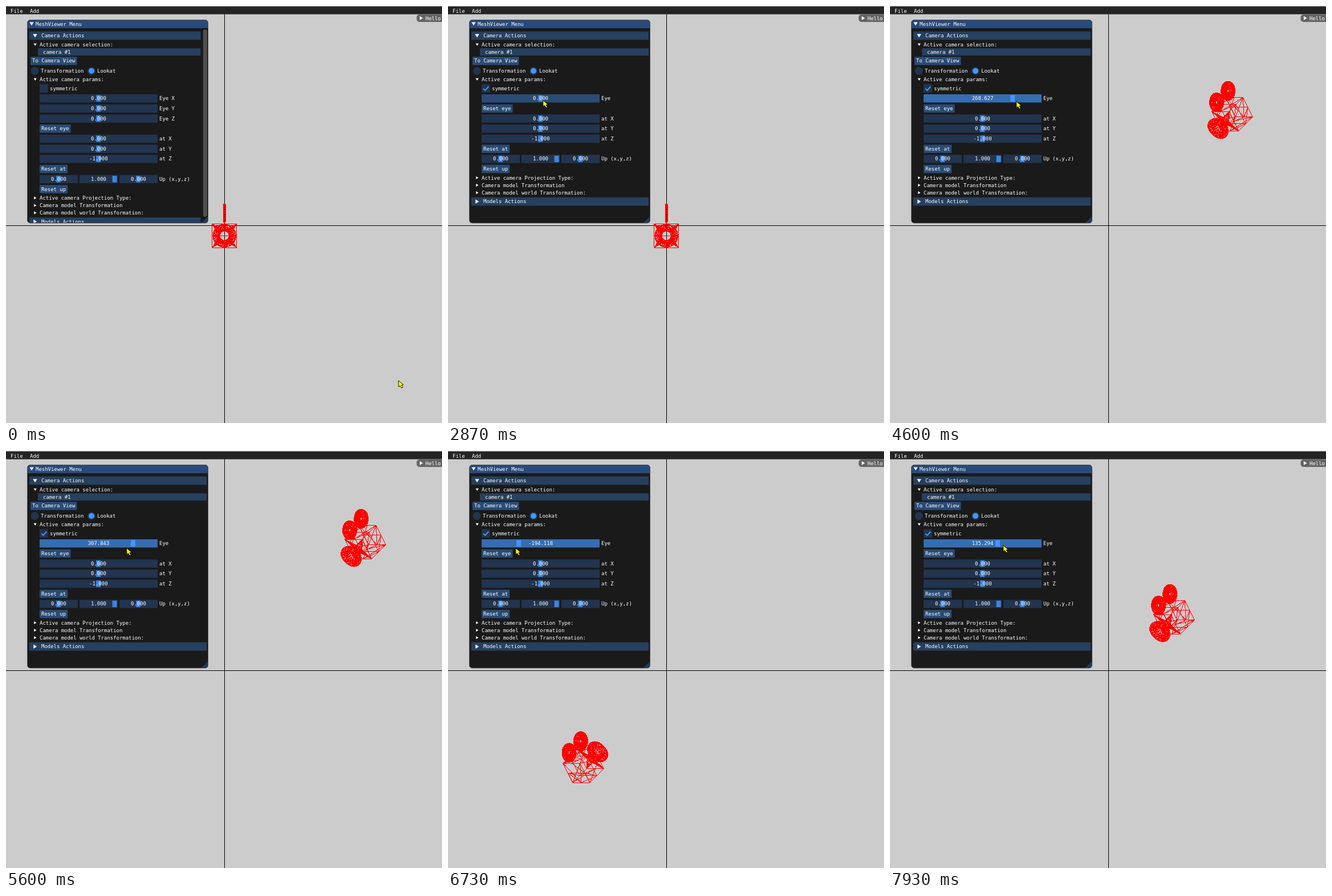
These frames come from a looping animation (765x732 px, 8 s). An HTML page:

```html
<!DOCTYPE html>
<html lang="en">
<head>
<meta charset="utf-8">
<title>Mesh viewer</title>
<style>
html, body { margin: 0; width: 100%; height: 100%; overflow: hidden; background: #ccc; }
svg { display: block; width: 765px; height: 732px; }
text { font: 8.95px "DejaVu Sans Mono", monospace; fill: #fff; white-space: pre; }
</style>
</head>
<body>
<svg id="stage" viewBox="0 0 765 732" xmlns="http://www.w3.org/2000/svg">
  <defs><clipPath id="inside"><rect x="38" y="39" width="316" height="341.5"/></clipPath></defs>
</svg>
<script>
const NS = 'http://www.w3.org/2000/svg';
const stage = document.getElementById('stage');
const C = {
  frame: '#22344e', hover: '#2a4c74', active: '#356db0', header: '#26405f',
  grab: '#3d85e0', bright: '#4296fa'
};
const ROW = 17.7, CHAR = 5.39;

// ---------- drawing helpers ----------
function el(parent, tag, attrs) {
  const node = document.createElementNS(NS, tag);
  for (const key in attrs) node.setAttribute(key, attrs[key]);
  parent.appendChild(node);
  return node;
}
const rect = (p, x, y, width, height, fill, rx = 0) => el(p, 'rect', { x, y, width, height, fill, rx });
function label(p, x, mid, str, anchor = 'start') {
  const node = el(p, 'text', { x, y: mid + 3, 'text-anchor': anchor });
  node.textContent = str;
  return node;
}
function arrow(p, x, y, r, down) {
  const d = down ? `M${x - r} ${y - r * .75}h${2 * r}l${-r} ${1.6 * r}z`
                 : `M${x - r * .75} ${y - r}v${2 * r}l${1.6 * r} ${-r}z`;
  el(p, 'path', { d, fill: '#fff' });
}
function header(p, mid, str, down) {
  const bar = rect(p, 41, mid - 7.3, 311, 14.6, C.header);
  arrow(p, 51, mid, 3.7, down);
  label(p, 62, mid, str);
  return bar;
}
function tree(p, mid, str, down) {
  arrow(p, 51.2, mid - .3, 2.6, down);
  label(p, 59, mid, str);
}
function button(p, x, mid, str) {
  rect(p, x, mid - 7.2, str.length * CHAR + 6, 14.4, C.hover);
  label(p, x + 3, mid, str);
}
function slider(p, x, width, mid, value, grabX, name) {
  const bg = rect(p, x, mid - 7.2, width, 14.4, C.frame);
  const grab = rect(p, grabX - 4, mid - 5.7, 8, 11.4, C.grab);
  const text = label(p, x + width / 2, mid, value, 'middle');
  const title = name && label(p, 269, mid, name);
  return { bg, grab, text, title };
}

// ---------- scene ----------
rect(stage, 383, 0, 1, 732, '#000');
rect(stage, 0, 385, 765, 1, '#000');
const model = el(stage, 'path', {
  fill: 'none', stroke: '#f00', 'stroke-width': 1, 'shape-rendering': 'crispEdges'
});

rect(stage, 0, 0, 765, 14.5, '#242424');
rect(stage, 0, 0, 765, 1, '#9a9a9a');
label(stage, 8, 8.5, 'File');
label(stage, 42, 8.5, 'Add');

rect(stage, 720.5, 15, 60, 13, '#646464', 5);
arrow(stage, 728.5, 21.3, 3.5, false);
label(stage, 736, 21.5, 'Hello, world!');

// ---------- menu window ----------
rect(stage, 37.5, 24.5, 317, 356.5, '#1a1a1a', 5);
el(stage, 'path', { d: 'M38 39V29.500q0-5 5-5H349q5 0 5 5V39z', fill: '#294a7a' });
arrow(stage, 45, 31.2, 3.6, true);
label(stage, 52, 31.5, 'MeshViewer Menu');

const body = el(stage, 'g', { 'clip-path': 'url(#inside)' });
const wideBars = [header(body, 52, 'Camera Actions', true)];
tree(body, 68, 'Active camera selection:', true);
wideBars.push(rect(body, 56, 74.3, 296, 12.8, C.header));
label(body, 65, 81, 'camera #1');
button(body, 43, 96.4, 'To Camera View');
const dot = (cx, r, fill) => el(body, 'circle', { cx, cy: 114, r, fill });
dot(50.5, 7, C.frame);
label(body, 61, 114, 'Transformation');
dot(150, 7, C.frame);
dot(150, 5, C.bright);
label(body, 160, 114, 'Lookat');
tree(body, 129, 'Active camera params:', true);
const check = rect(body, 59, 137.2, 14.8, 14.8, C.frame);
const tick = el(body, 'path', {
  d: 'M62 144.800l3.200 3.300 6-6.600', fill: 'none', stroke: C.bright, 'stroke-width': 1.9
});
label(body, 77, 145, 'symmetric');

const eye = slider(body, 59, 207, 162.2, '0.000', 162.3, 'Eye X');
const extra = el(body, 'g', {});
['Eye Y', 'Eye Z'].forEach((name, i) =>
  slider(extra, 59, 207, 162.2 + ROW * (i + 1), '0.000', 162.3, name));

const lower = el(body, 'g', {});
const rowY = n => 162.2 + ROW * n;
button(lower, 59, rowY(3), 'Reset eye');
['X', 'Y', 'Z'].forEach((axis, i) =>
  slider(lower, 59, 207, rowY(4 + i), i < 2 ? '0.000' : '-1.000', 162.2, 'at ' + axis));
button(lower, 59, rowY(7), 'Reset at');
slider(lower, 59, 67, rowY(8), '0.000', 92.2);
slider(lower, 129, 67, rowY(8), '1.000', 190.6);
slider(lower, 199, 67, rowY(8), '0.000', 232.2, 'Up (x,y,z)');
button(lower, 59, rowY(9), 'Reset up');
['Active camera Projection Type:', 'Camera model Transformation', 'Camera model world Transformation:']
  .forEach((str, i) => tree(lower, 337.2 + 13.1 * i, str, false));
wideBars.push(header(lower, 378.6, 'Models Actions', false));

const scroll = el(stage, 'g', {});
rect(scroll, 344.5, 39, 9.5, 332, '#121212');
rect(scroll, 345.7, 41, 7.3, 329, '#4f4f4f', 3.6);
el(stage, 'path', { d: 'M354 369.500V377q0 4-4 4H342.500z', fill: '#223a58' });
el(stage, 'rect', {
  x: 37.5, y: 24.5, width: 317, height: 356.5, rx: 5,
  fill: 'none', stroke: '#434350', 'stroke-width': .8
});

const cursor = el(stage, 'path', {
  d: 'M.500.500L1 11.800 3.500 9.500 6 13.500 8.300 12.500 6 8.500 9.300 7.800z',
  fill: '#ff0', stroke: '#000', 'stroke-width': .9, 'stroke-linejoin': 'round'
});

// ---------- movie camera mesh: X right, Y up, Z backwards ----------
const edges = [];
const line = (...pts) => { for (let i = 1; i < pts.length; i++) edges.push([pts[i - 1], pts[i]]); };
const mid = (a, b) => a.map((n, i) => (n + b[i]) / 2);

// A surface of triangles through successive rings given as point(angle).
function surface(rings, count) {
  const at = (r, i) => rings[r]((i + r % 2 / 2) * 2 * Math.PI / count);
  for (let r = 0; r < rings.length; r++)
    for (let i = 0; i < count; i++) {
      line(at(r, i), at(r, i + 1));
      if (r) {
        const shift = r % 2 ? 1 : -1;
        line(at(r - 1, i), at(r, i));
        line(at(r - 1, i), at(r, i - shift));
      }
    }
}

// reels
for (const z of [23, -12])
  surface([[2, 4], [2, 8], [2, 12], [2, 15], [1, 16.7], [-1, 16.7], [-2, 15], [-2, 12], [-2, 8], [-2, 4]]
    .map(([x, r]) => a => [x, 21.5 + r * Math.sin(a), z + r * Math.cos(a)]), 22);

// flared lens
surface([[8, -13.5], [8.5, -18], [11, -23], [15, -27], [19, -31], [20.3, -36], [19, -40], [15.5, -41], [12, -38], [9, -32]]
  .map(([r, z]) => a => [r * Math.cos(a), -18 + r * Math.sin(a), z]), 24);

// body
const corner = (x, y, z) => [x ? 21.3 : -21.3, y ? 3 : -38.7, z ? 29 : -13.5];
function face(a, b, c, d) {
  const ab = mid(a, b), bc = mid(b, c), cd = mid(c, d), da = mid(d, a);
  line(a, b, c, d, a);
  line(ab, c);
  line(ab, d);
  line(ab, bc);
  line(da, cd);
  line(da, bc);
}
const [p0, p1, p2, p3, p4, p5, p6, p7] =
  [0, 1, 2, 3, 4, 5, 6, 7].map(i => corner(i & 1, i & 2, i & 4));
face(p4, p5, p7, p6);
face(p0, p1, p5, p4);
face(p2, p3, p7, p6);
face(p0, p2, p6, p4);
face(p1, p3, p7, p5);
line(p0, p1, p3, p2, p0);
[[p3, 0], [p2, 1], [p0, 2], [p1, 3]].forEach(([p, quarter]) => {
  for (let i = 0; i <= 6; i++) {
    const a = (quarter + i / 6) * Math.PI / 2;
    line(p, [8 * Math.cos(a), -18 + 8 * Math.sin(a), -13.5]);
  }
});

// Look-at orientation of an eye at (v,v,v) aimed at (0,0,-1), seen from the front.
function drawModel(v) {
  const len = Math.hypot(v, v, v + 1);
  const fx = -v / len, fy = -v / len, fz = -(v + 1) / len;
  const side = Math.hypot(fx, fz), rx = -fz / side, rz = fx / side;
  const ux = -rz * fy, uy = rz * fx - rx * fz;
  const ox = 383.2 + .765 * v, oy = 385.3 - .765 * v;
  const put = ([x, y, z]) =>
    (ox + rx * x + ux * y - fx * z).toFixed(1) + ' ' + (oy - uy * y + fy * z).toFixed(1);
  model.setAttribute('d', edges.map(([a, b]) => 'M' + put(a) + 'L' + put(b)).join(''));
}

// ---------- motion ----------
function track(keys, t) {
  let i = 1;
  while (i < keys.length - 1 && t > keys[i][0]) i++;
  const [a, b] = [keys[i - 1], keys[i]];
  const u = Math.min(1, Math.max(0, (t - a[0]) / (b[0] - a[0])));
  return a.slice(1).map((n, j) => n + (b[j + 1] - n) * u);
}
const ease = u => u * u * (3 - 2 * u);

// slider step out of 255
const drag = [[3200, 127], [3270, 128], [3700, 144], [4070, 164], [4400, 181], [4600, 196], [4730, 205],
  [4930, 211], [5200, 222], [5270, 224], [5400, 221], [5600, 206], [5800, 185], [6000, 158],
  [6270, 113], [6400, 103], [6670, 82], [6930, 67], [7050, 66], [7270, 78], [7400, 92],
  [7530, 102], [7600, 112], [7930, 162], [8070, 176]];
const dragY = [[3200, 163], [4600, 167], [5600, 170], [6270, 170], [7270, 169], [7930, 165]];
const hops = [[0, 870, 688, 657, 238, 312], [870, 1670, 238, 312, 101, 145],
  [2070, 2600, 101, 145, 170, 165], [2800, 2870, 170, 165, 166, 165], [3000, 3130, 166, 165, 162, 163]];
const stepValue = k => (k / 255 - .5) * 1000;
const grabAt = v => 162.3 + .1965 * v;
const PRESS = 3265, TOGGLE = 2065;

function pointer(t) {
  if (t >= PRESS - 60) return [grabAt(stepValue(track(drag, t + 130)[0])) - 1, track(dragY, t)[0]];
  const [from, to, x0, y0, x1, y1] = hops.filter(h => t >= h[0]).pop();
  const u = ease(Math.min(1, (t - from) / (to - from)));
  return [x0 + (x1 - x0) * u, y0 + (y1 - y0) * u];
}

function render(t) {
  const symmetric = t >= TOGGLE, dragging = t >= PRESS;
  const v = dragging ? stepValue(Math.round(track(drag, t)[0])) : 0;
  const [x, y] = pointer(t);
  cursor.setAttribute('transform', `translate(${Math.round(x)} ${Math.round(y)})`);

  const show = (node, on) => node.setAttribute('display', on ? 'inline' : 'none');
  show(extra, !symmetric);
  show(scroll, !symmetric);
  show(tick, symmetric);
  lower.setAttribute('transform', `translate(0 ${symmetric ? -2 * ROW : 0})`);
  wideBars.forEach(bar => bar.setAttribute('width', (symmetric ? 352 : 341.5) - bar.getAttribute('x')));

  const onCheck = symmetric && x < 125 && y < 153;
  check.setAttribute('fill', t >= 1925 && !symmetric ? C.active : onCheck ? C.hover : C.frame);
  const onEye = symmetric && y >= 155;
  eye.bg.setAttribute('fill', dragging ? C.active : onEye ? C.hover : C.frame);
  eye.grab.setAttribute('fill', dragging ? C.bright : C.grab);
  eye.grab.setAttribute('x', grabAt(v) - 4);
  eye.text.textContent = v.toFixed(3);
  eye.title.textContent = symmetric ? 'Eye' : 'Eye X';
  drawModel(v);
}

// The picture advances fifteen times a second.
const FRAME = 1000 / 15;
let last = -1;
function tick15(now) {
  const n = Math.floor((now % 8000) / FRAME + .06) % 120;
  if (n !== last) render((last = n) * FRAME);
  requestAnimationFrame(tick15);
}
render(0);
requestAnimationFrame(tick15);
</script>
</body>
</html>
```
